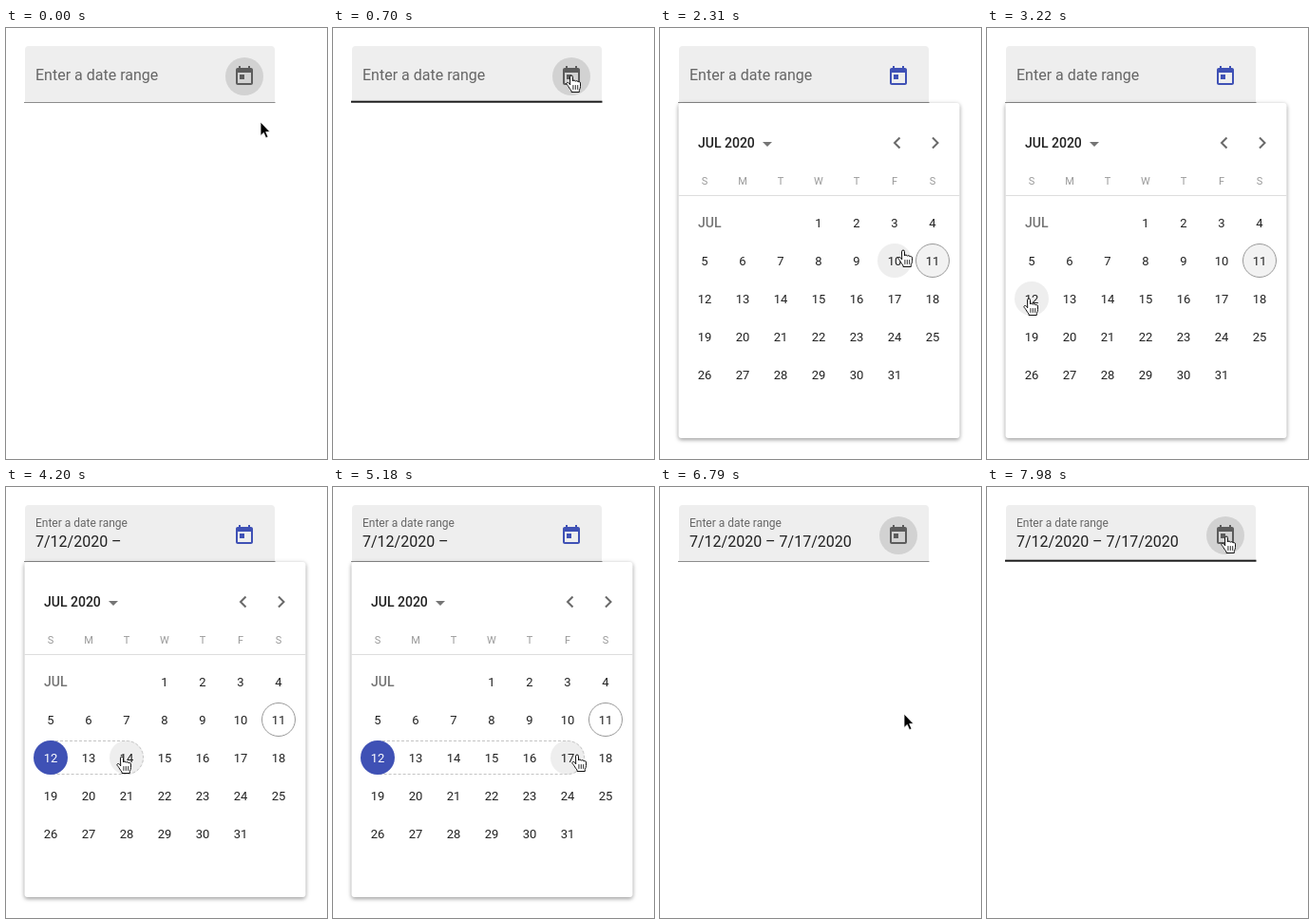
Animation of 338x454 px, one loop 8 s. Source, as an HTML page:

```html
<!DOCTYPE html>
<html lang="en">
<head>
<meta charset="utf-8">
<title>Date range picker</title>
<style>
  html, body { margin: 0; width: 100%; height: 100%; overflow: hidden; background: #fff; }
  svg { display: block; width: 338px; height: 454px; font-family: Roboto, sans-serif; }
  #popup { transform-origin: 168px 79px; }
  .panel { fill: #fff; filter: drop-shadow(0 2px 2px rgba(0,0,0,.3)) drop-shadow(0 0 2px rgba(0,0,0,.12)); }
  .heading { font-size: 14px; font-weight: 500; }
  .weekday { font-size: 11px; fill: #999; text-anchor: middle; }
  .day { font-size: 13px; fill: #212121; text-anchor: middle; }
  .day.selected { fill: #fff; }
  .chevron { fill: none; stroke: #696969; stroke-width: 2; }
  .mark { fill: #3f51b5; }
</style>
</head>
<body>
<svg viewBox="0 0 338 454">
  <path d="M20 78V23q0-4 4-4H279q4 0 4 4V78Z" fill="#eee"/>
  <rect id="underline" x="19" width="264.5"/>
  <text id="label" x="31" fill="#666">Enter a date range</text>
  <text id="value" x="31" y="63" font-size="16" fill="#212121"></text>
  <circle id="disc" cx="251" cy="51" r="20"/>
  <path id="icon" transform="translate(239 39)" d="M19 3h-1V1h-2v2H8V1H6v2H5c-1.1 0-2 .9-2 2v14c0 1.1.9 2 2 2h14c1.1 0 2-.9 2-2V5c0-1.1-.9-2-2-2zm0 16H5V8h14v11zM7 10h5v5H7z"/>

  <g id="popup">
    <rect class="panel" x="19.5" y="79" width="296" height="353" rx="3"/>
    <text class="heading" x="40" y="126" fill="#212121">JUL 2020</text>
    <path d="M108 120h10l-5 5z" fill="#757575"/>
    <path class="chevron" d="M252.5 115.5l-5.5 5.5 5.5 5.5M287 115.5l5.5 5.5-5.5 5.5"/>
    <path d="M19.5 176.5h296" stroke="#ddd"/>
    <text class="heading" x="40" y="210" fill="#757575">JUL</text>
    <circle id="today" cx="287" cy="245" r="17.5" stroke="#999"/>
    <circle id="hover" r="18" fill="#eee"/>
    <path id="range" stroke="#c4c4c4" stroke-dasharray="3 2"/>
    <circle id="start" class="mark" cx="47" cy="285" r="18"/>
    <circle id="end" class="mark" cx="247" cy="285" r="18"/>
    <g id="days"></g>
  </g>

  <circle id="ring" fill="#5b7fe0" fill-opacity=".05" stroke="#7b9aea" stroke-width="1.2"/>
  <g id="cursor">
    <path id="arrow" d="M0 0V14.5L3.3 11.4 5.6 16.7 8 15.7 5.7 10.5H10Z" stroke="#fff" stroke-width=".8"/>
    <g id="hand" stroke="#111" stroke-linecap="round" stroke-linejoin="round">
      <path fill="#fff" d="M-1.5 1.5a1.5 1.5 0 0 1 3 0V6q.2-.9 1.4-.9 1.4 0 1.5 1.2.3-.7 1.4-.6 1.2.1 1.3 1.3.3-.5 1.2-.4 1.2.2 1.2 1.5V11.5q0 2-1.2 4V17.5H0V16q-1.5-1.5-3-4.2-1-1.6-1.8-2.4-.7-1.1.3-1.8 1-.5 2 .5L-1.5 9.5Z"/>
      <path fill="none" stroke-width=".9" d="M1.9 10.5v4M4.3 10.5v4M6.7 10.5v4"/>
    </g>
  </g>
</svg>
<script>
const LOOP = 8000, STEP = 70;
const OPEN = 1050, PICK_START = 3500, PICK_END = 5250;
const START_DAY = 12, END_DAY = 17, FIRST_COLUMN = 3;

const ease = {
  in: p => p ** 3,
  out: p => 1 - (1 - p) ** 3,
  both: p => p * p * (3 - 2 * p),
  linear: p => p
};

// Cursor stops: time, x, y and the easing used to get there
const stops = [
  [0, 268, 99],
  [700, 251, 50, 'both'],
  [1540, 251, 50, 'linear'],
  [2310, 256, 234, 'both'],
  [3150, 46, 286, 'both'],
  [3220, 44, 285, 'linear'],
  [3640, 44, 285, 'linear'],
  [4200, 122, 284, 'both'],
  [5040, 257, 282, 'both'],
  [5250, 257, 282, 'linear'],
  [6300, 257, 285, 'linear'],
  [6790, 257, 239, 'in'],
  [7070, 256, 136, 'linear'],
  [7750, 252, 52, 'out'],
  [LOOP, 252, 52, 'linear']
];
const clicks = [[980, 251, 50], [3430, 47, 285], [5180, 255, 283]];

const el = {};
document.querySelectorAll('[id]').forEach(node => el[node.id] = node);
const set = (node, attrs) => {
  for (const name in attrs) node.setAttribute(name, attrs[name]);
};
const show = (node, visible) => { node.style.display = visible ? '' : 'none'; };
const progress = (t, from, length) => Math.min(1, Math.max(0, (t - from) / length));
const mix = (a, b, p) => a + (b - a) * p;
const column = i => 47 + 40 * i;
const dayPlace = day => {
  const slot = day - 1 + FIRST_COLUMN;
  return { x: column(slot % 7), y: 205 + 40 * Math.floor(slot / 7) };
};

function addText(parent, content, attrs) {
  const node = document.createElementNS('http://www.w3.org/2000/svg', 'text');
  node.textContent = content;
  set(node, attrs);
  parent.appendChild(node);
  return node;
}

[...'SMTWTFS'].forEach((letter, i) =>
  addText(el.popup, letter, { class: 'weekday', x: column(i), y: 165 }));

const dayNodes = Array.from({ length: 31 }, (_, i) => {
  const { x, y } = dayPlace(i + 1);
  return addText(el.days, i + 1, { class: 'day', x, y: y + 4.7 });
});

function cursorAt(t) {
  const next = Math.max(1, stops.findIndex(stop => stop[0] > t));
  const [t0, x0, y0] = stops[next - 1], [t1, x1, y1, kind] = stops[next];
  const p = ease[kind]((t - t0) / (t1 - t0));
  return { x: mix(x0, x1, p), y: mix(y0, y1, p) };
}

function dayAt({ x, y }) {
  const col = Math.floor((x - 27) / 40), row = Math.floor((y - 185) / 40);
  const day = row * 7 + col + 1 - FIRST_COLUMN;
  return row >= 0 && col >= 0 && col < 7 && day >= 1 && day <= 31 ? day : 0;
}

function drawField(t, cursor, isOpen) {
  const overField = cursor.y < 78 && (t < 1600 || t > 7000);
  set(el.underline, overField
    ? { y: 76.7, height: 2, fill: '#1c1c1c' }
    : { y: 78, height: 1, fill: '#8c8c8c' });

  const lift = ease.both(progress(t, PICK_START - 70, 210));
  set(el.label, { y: mix(55, 42, lift), 'font-size': mix(16, 12, lift) });
  el.value.textContent = t < PICK_START + 70 ? ''
    : t < PICK_END ? '7/12/2020 –' : '7/12/2020 – 7/17/2020';

  const discFade = isOpen ? 1 - progress(t, 1400, 280) : 1;
  set(el.disc, { fill: isOpen ? '#d8d8e5' : '#d2d2d2', opacity: discFade });
  set(el.icon, { fill: isOpen ? '#3f51b5' : '#5c5c5c' });
}

function drawPopup(t, hovered) {
  const grow = ease.out(progress(t, OPEN, 170));
  const opacity = grow * (1 - progress(t, PICK_END, 170));
  show(el.popup, opacity > 0);
  el.popup.style.opacity = opacity;
  el.popup.style.transform = `scaleY(${mix(.8, 1, grow)})`;

  const started = t >= PICK_START, ended = t >= PICK_END;
  set(el.today, { fill: started ? '#fff' : '#f2f2f2' });
  show(el.start, started);
  show(el.end, ended);
  show(el.hover, hovered && !ended);
  if (hovered) {
    const { x, y } = dayPlace(hovered);
    set(el.hover, { cx: x, cy: y });
  }

  const last = ended ? END_DAY : hovered;
  show(el.range, started && last > START_DAY);
  if (last) set(el.range, {
    d: `M47 267.5H${dayPlace(last).x}a17.5 17.5 0 0 1 0 35H47`,
    fill: ended ? '#d9dcf0' : 'none'
  });

  dayNodes.forEach((node, i) => node.classList.toggle('selected',
    started && i + 1 === START_DAY || ended && i + 1 === END_DAY));
}

function drawPointer(t, cursor, isOpen, hovered) {
  const overIcon = Math.hypot(cursor.x - 251, cursor.y - 51) < 20 && (!isOpen || t < 1600);
  const overChevron = isOpen && Math.hypot(cursor.x - 249, cursor.y - 121) < 20;
  const pointing = Boolean(overIcon || overChevron || hovered);
  show(el.hand, pointing);
  show(el.arrow, !pointing);
  set(el.cursor, { transform: `translate(${cursor.x} ${cursor.y})` });

  const click = clicks.find(([at]) => t > at && t < at + 420);
  show(el.ring, click);
  if (click) {
    const [at, cx, cy] = click, p = (t - at) / 420;
    set(el.ring, { cx, cy, r: 36 * (1 - (1 - p) ** 2), opacity: 1 - p ** 4 });
  }
}

function draw() {
  const t = Math.floor(performance.now() % LOOP / STEP) * STEP;
  const cursor = cursorAt(t);
  const isOpen = t >= OPEN && t < PICK_END + 70;
  const hovered = isOpen ? dayAt(cursor) : 0;
  drawField(t, cursor, isOpen);
  drawPopup(t, hovered);
  drawPointer(t, cursor, isOpen, hovered);
  requestAnimationFrame(draw);
}
draw();
</script>
</body>
</html>
```
